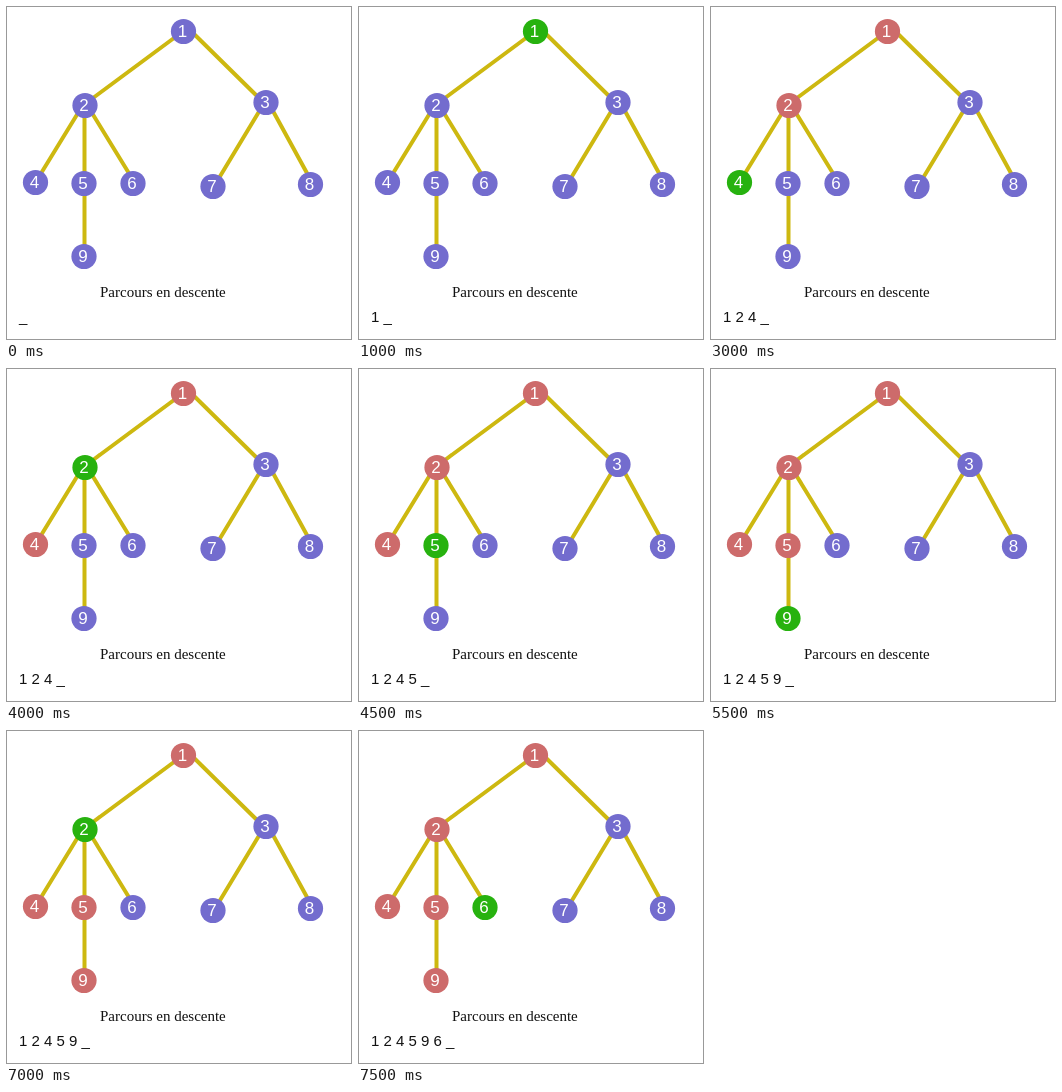
These frames come from a looping animation (346 by 334 pixels, 8000 ms). An HTML page:

```html
<!DOCTYPE html>
<html lang="fr">
<head>
<meta charset="utf-8">
<style>
html, body { margin: 0; width: 100%; height: 100%; overflow: hidden; background: #fff; }
svg { display: block; }
text { font-family: "Liberation Sans", Arial, sans-serif; }
.edges { stroke: #cdb810; stroke-width: 4; fill: none; }
.nodes text { font-size: 17px; fill: #fff; text-anchor: middle; }
#caption { font: 15px "Liberation Serif", "Times New Roman", serif; fill: #111; }
#trail { font-size: 15px; fill: #111; }
</style>
</head>
<body>
<svg width="346" height="334" viewBox="0 0 346 334">
  <rect x=".5" y=".5" width="345" height="333" fill="#fff" stroke="#999"/>
  <path class="edges" d="M168 32L87 92M187 27L253 92M72 107L34 169M78.5 105V245M86 107L124 169M254 104L213 172M267 105L302 169"/>
  <g class="nodes"></g>
  <text id="caption" x="94" y="290.5">Parcours en descente</text>
  <text id="trail" x="13" y="316"></text>
</svg>
<script>
const IDLE = '#736cce', ACTIVE = '#27b20f', SEEN = '#cd6b6b';
const LOOP = 8000;

// node centres, numbered from 1
const centres = [
  [177.5, 25.5], [79, 99.5], [260, 96.5],
  [29.5, 176.5], [78, 177.5], [127, 177.5],
  [207, 180.5], [304.5, 178.5], [78, 250.5]
];

// [start time, node being visited]; 0 means none yet
const visits = [
  [0, 0], [1000, 1], [2000, 2], [3000, 4], [4000, 2],
  [4500, 5], [5500, 9], [6500, 5], [7000, 2], [7500, 6]
];

const group = document.querySelector('.nodes');
const trail = document.getElementById('trail');

function add(tag, attrs) {
  const el = document.createElementNS('http://www.w3.org/2000/svg', tag);
  for (const key in attrs) el.setAttribute(key, attrs[key]);
  return group.appendChild(el);
}

const discs = centres.map(([cx, cy], i) => {
  const disc = add('circle', { cx, cy, r: 12.6 });
  add('text', { x: cx - 1, y: cy + 5.5 }).textContent = i + 1;
  return disc;
});

function draw(now) {
  const t = now % LOOP;
  const path = visits.filter(([start]) => start <= t).map(([, node]) => node);
  const current = path[path.length - 1];
  const seen = new Set(path.filter(Boolean));
  discs.forEach((disc, i) => {
    const n = i + 1;
    disc.setAttribute('fill', n === current ? ACTIVE : seen.has(n) ? SEEN : IDLE);
  });
  trail.textContent = [...seen, '_'].join(' ');
}

function tick() {
  draw(performance.now());
  requestAnimationFrame(tick);
}
tick();
</script>
</body>
</html>
```
